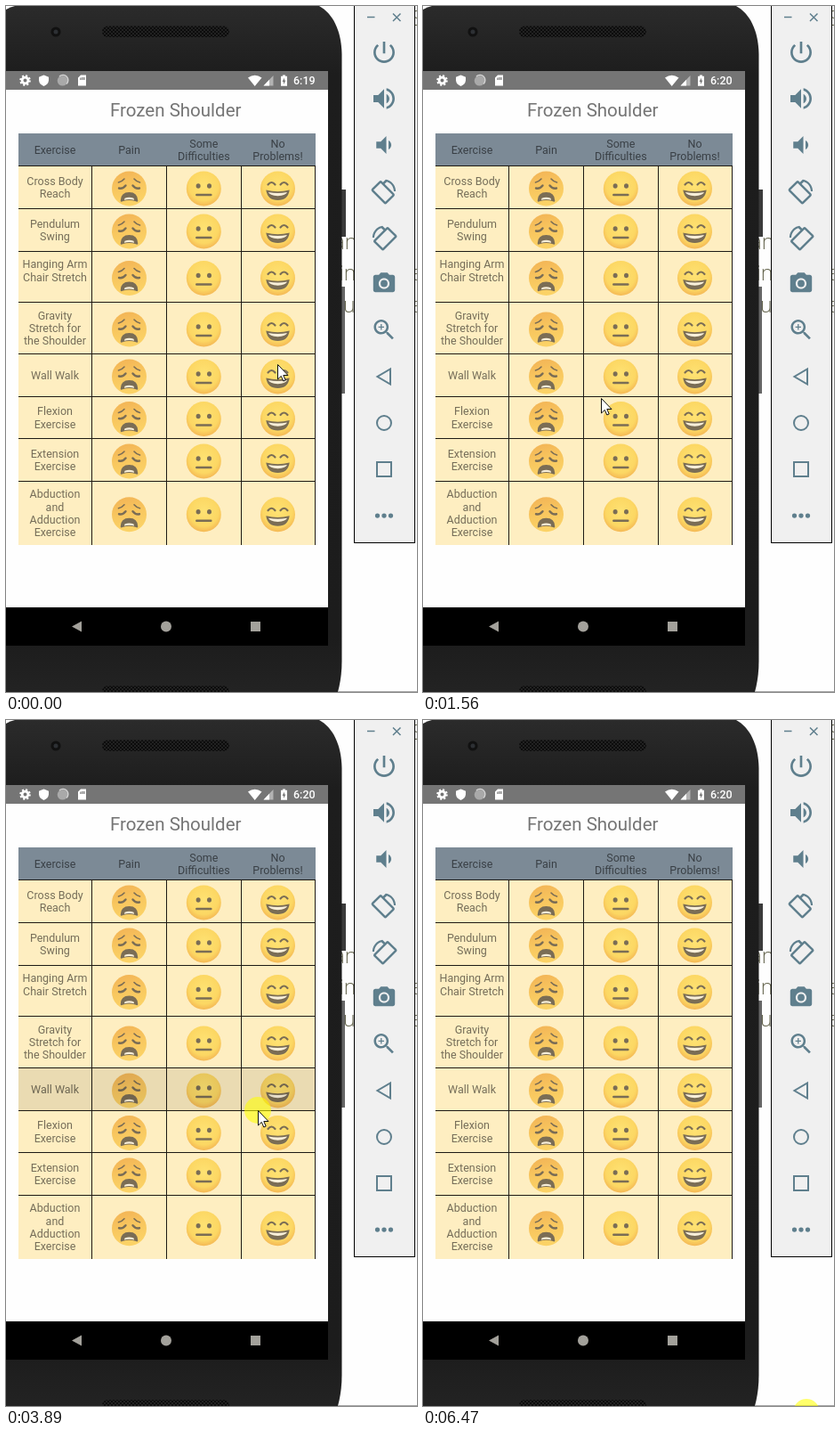
Animation of 462 by 770 pixels, one loop 6540 ms. Source, as an HTML page:

```html
<!DOCTYPE html>
<html lang="en">
<head>
<meta charset="utf-8">
<title>Exercise rating</title>
<style>
  html, body { margin: 0; width: 100%; height: 100%; overflow: hidden; background: #fefefe; }
  svg { display: block; width: 462px; height: 770px; }
  text { font-family: Roboto, sans-serif; }
  .cell { font-size: 12.5px; text-anchor: middle; fill: #000; fill-opacity: .54; }
  .page text { font: 300 23px "Open Sans", sans-serif; fill: #66664f; }
  .ink { fill: none; stroke: #7a6d55; stroke-linecap: round; stroke-linejoin: round; }
  .dark { fill: #7a6d55; }
  .teeth { fill: #f8efd9; }
  #dialog { transform-origin: 180px 384px; }
  #card { filter: drop-shadow(0 7px 7px rgba(0, 0, 0, .42)); }
  .line { fill: none; stroke: #5f7f8d; stroke-width: 2; }
</style>
</head>
<body>
<svg viewBox="0 0 462 770">
  <defs>
    <radialGradient id="skin" cx=".5" cy=".42" r=".6">
      <stop offset="0" stop-color="#fee273"/>
      <stop offset=".7" stop-color="#fcd763"/>
      <stop offset="1" stop-color="#f3b453"/>
    </radialGradient>
    <linearGradient id="sore" x2=".25" y2="1">
      <stop offset="0" stop-color="#f2b255"/>
      <stop offset=".55" stop-color="#f8c75f"/>
      <stop offset="1" stop-color="#fbd266"/>
    </linearGradient>
    <linearGradient id="shell" x2="0" y2="1">
      <stop offset="0" stop-color="#2b2b2b"/>
      <stop offset=".1" stop-color="#1d1d1d"/>
      <stop offset=".92" stop-color="#1c1c1c"/>
      <stop offset="1" stop-color="#232323"/>
    </linearGradient>
    <pattern id="mesh" width="4" height="4" patternUnits="userSpaceOnUse">
      <rect width="4" height="4" fill="#0c0c0c"/>
      <circle cx="1" cy="1" r=".9" fill="#2b2b2b"/>
      <circle cx="3" cy="3" r=".9" fill="#2b2b2b"/>
    </pattern>
    <g id="pain">
      <circle r="19.5" fill="url(#sore)"/>
      <path class="ink" stroke-width="1.6" d="M-12-7Q-8-8-5.5-11M12-7Q8-8 5.5-11"/>
      <path class="ink" stroke-width="2.4" d="M-11.5-.5Q-7 .5-4-3.5M11.5-.5Q7 .5 4-3.5"/>
      <path class="dark" d="M-9.8 13.5Q-9.5 4 0 4Q9.5 4 9.8 13.5Q9.5 15.5 7.5 14.3Q0 11.5-7.5 14.3Q-9.5 15.5-9.8 13.5Z"/>
      <path class="teeth" d="M-5 10.8Q0 8.8 5 10.8L5.6 12.8Q0 11-5.6 12.8Z"/>
    </g>
    <g id="some">
      <circle r="19.5" fill="url(#skin)"/>
      <ellipse class="dark" cx="-6.2" cy="-3" rx="2.5" ry="2.8"/>
      <ellipse class="dark" cx="6.2" cy="-3" rx="2.5" ry="2.8"/>
      <path class="ink" stroke-width="2.5" d="M-8 7H8"/>
    </g>
    <g id="fine">
      <circle r="19.5" fill="url(#skin)"/>
      <path class="ink" stroke-width="2.2" d="M-11-4.5Q-7-9.5-3-4.5M3-4.5Q7-9.5 11-4.5"/>
      <path class="dark" d="M-13.2 1.5Q0 5 13.2 1.5Q11.5 13 0 13Q-11.5 13-13.2 1.5Z"/>
      <path class="teeth" d="M-10.5 4Q0 6.2 10.5 4Q9.500 7.500 0 8.300Q-9.500 7.500-10.500 4Z"/>
    </g>
  </defs>

  <rect width="462" height="770" fill="#fefefe"/>
  <g class="page">
    <text x="368.5" y="273">an</text>
    <text x="374.5" y="308">in</text>
    <text x="379" y="344">u</text>
    <text x="455" y="308">e</text>
    <text x="455" y="344">e</text>
    <text x="455" y="22">S</text>
  </g>

  <!-- phone -->
  <path d="M377 206H382V259H377Z" fill="#3a3a3a"/>
  <path d="M377 315H381V435H377Z" fill="#666"/>
  <path d="M0 4Q5 1 10 0H352C367 8 377 27 377.500 54V735Q377.500 754 373 770H0Z" fill="url(#shell)"/>
  <rect x="108" y="22.5" width="143" height="12.5" rx="6" fill="url(#mesh)"/>
  <rect x="108" y="763" width="143" height="12.5" rx="6" fill="url(#mesh)"/>
  <circle cx="56" cy="29" r="5.5" fill="#111"/>
  <circle cx="56" cy="29" r="2.5" fill="#2d3034"/>
  <path d="M373 769.5H462" stroke="#a5a5a5"/>

  <!-- app -->
  <rect y="73" width="362" height="602" fill="#fefefe"/>
  <rect y="73" width="362" height="21" fill="#757575"/>
  <text x="117" y="124" font-size="20.5" fill="#757575">Frozen Shoulder</text>
  <g id="table"></g>
  <rect id="tint" x="14" width="334"/>
  <rect id="dim" y="73" width="362" height="602"/>

  <!-- status bar -->
  <g fill="#fff">
    <circle cx="21.5" cy="83.5" r="3.4" fill="none" stroke="#fff" stroke-width="2.8"/>
    <circle cx="21.5" cy="83.5" r="5.4" fill="none" stroke="#fff" stroke-width="1.8" stroke-dasharray="2.1 2.14"/>
    <path d="M42.5 77.5L48 79.7V83.5Q47.5 88 42.5 90Q37.5 88 37 83.5V79.7Z"/>
    <circle cx="63.5" cy="83.8" r="5.8" fill="#a9a9a9"/>
    <path d="M60 79A5.8 5.8 0 0 1 68 87.5" fill="none" stroke="#d5d5d5" stroke-width="1.4"/>
    <path fill-rule="evenodd" d="M84 77.5H90V89.5H81V80.5ZM83.3 80.5V83H84.5V80.5ZM85.3 80V83H86.5V80ZM87.3 80V83H88.5V80Z"/>
    <path d="M272 80.5Q279.7 75 287.5 80.5L279.7 90Z"/>
    <path d="M300.5 78V89.5H289.5Z" opacity=".45"/>
    <path d="M296 82.7V89.5H289.5Z"/>
    <path fill-rule="evenodd" d="M311 77.5H314V78.8H316V89.8H309V78.8H311ZM313 80.5L310.6 85H312V88L314.4 83.5H313Z"/>
    <text id="clock" x="323" y="88" font-size="12.5" font-weight="500"></text>
  </g>

  <g id="dialog">
    <rect id="card" x="22" y="307" width="316" height="154.5" rx="2" fill="#fefefe"/>
    <g font-weight="500">
      <g font-size="15.8" fill="#212121">
        <text x="43.5" y="340">You have successfully rated exercise</text>
        <text id="number" x="43.5" y="358.5"></text>
      </g>
      <text x="291" y="441.5" font-size="12.3" fill="#0c8f82">OK</text>
    </g>
  </g>

  <!-- navigation bar -->
  <rect y="675" width="362" height="43"/>
  <g fill="#a3a19b">
    <path d="M85 690.5V702.5L74 696.5Z"/>
    <circle cx="180" cy="696.5" r="6"/>
    <rect x="275" y="691" width="11" height="11"/>
  </g>

  <!-- tool panel -->
  <rect x="391.5" y="-2" width="68" height="604.5" fill="#f0f0f0" stroke="#000"/>
  <g id="tools" fill="#5f7f8d"></g>
  <path class="line" style="stroke-width: 1.5" d="M406 12.5H414.5M435 8.500L443.500 17M443.500 8.500L435 17"/>
  <g class="line">
    <path d="M432 407.5V424.5L417.5 416Z"/>
    <circle cx="425" cy="468" r="8"/>
    <rect x="417" y="512" width="16" height="16"/>
  </g>

  <circle id="click" r="15" fill="#ff0" fill-opacity=".58"/>
  <path id="cursor" d="M.5.5V17L4.3 13.4L6.8 19L9.2 18L6.8 12.5H12Z" fill="#fff" stroke="#111"/>
</svg>

<script>
const $ = id => document.getElementById(id);

// Table
const edges = [179.5, 227.5, 275.5, 332.5, 390.5, 438.5, 485.5, 533.5, 605];
const columns = [96.5, 180.5, 264.5, 347.5];
const centers = [55, 138.5, 222.3, 305.5];
const rows = ['Cross Body|Reach', 'Pendulum|Swing', 'Hanging Arm|Chair Stretch|', 'Gravity|Stretch for|the Shoulder',
  'Wall Walk', 'Flexion|Exercise', 'Extension|Exercise', 'Abduction|and|Adduction|Exercise'];
const heads = ['Exercise', 'Pain', 'Some|Difficulties', 'No|Problems!'];

function label(text, x, y) {
  const lines = text.split('|');
  return lines.map((s, i) =>
    `<text class="cell" x="${x}" y="${y + 4.5 + (i - (lines.length - 1) / 2) * 14.4}">${s}</text>`).join('');
}

function drawTable() {
  let out = '<rect x="14" y="143" width="334" height="37" fill="#7c8a96"/>' +
    '<rect x="14" y="180" width="334" height="425" fill="#feeec1"/>';
  heads.forEach((h, i) => out += label(h, centers[i], 161.7));
  rows.forEach((r, i) => {
    const mid = (edges[i] + edges[i + 1]) / 2;
    out += label(r, centers[0], mid);
    ['pain', 'some', 'fine'].forEach((f, j) =>
      out += `<use href="#${f}" x="${centers[j + 1]}" y="${mid + 1.5}"/>`);
  });
  const across = edges.slice(0, 8).map(y => `M14 ${y}H348`).join('');
  const down = columns.map(x => `M${x} 180V605`).join('');
  $('table').innerHTML = out + `<path d="${across}${down}" stroke="#1d1a14"/>`;
}

// Tool icons on a 24-unit grid
const rotate = '<rect x="-5.5" y="-8.5" width="11" height="17" rx="1" transform="translate(11 13) rotate(-45)" fill="none" stroke="#5f7f8d" stroke-width="2"/>' +
  '<path d="M22.5 12C22.5 6.500 18.500 2 13.500 1.300L10.500 4.300L12 5.800L14.500 3.400C18 4.500 20.500 7.500 20.800 12Z"/>';
const path = d => `<path d="${d}"/>`;
const icons = [
  [52, 1.33, path('M13 3h-2v10h2V3zm4.83 2.17l-1.42 1.42C17.99 7.86 19 9.81 19 12c0 3.87-3.13 7-7 7s-7-3.13-7-7c0-2.19 1.01-4.14 2.58-5.42L6.17 5.17C4.23 6.82 3 9.26 3 12c0 4.97 4.03 9 9 9s9-4.03 9-9c0-2.74-1.23-5.18-3.17-6.83z')],
  [104, 1.33, path('M3 9v6h4l5 5V4L7 9H3zm13.5 3c0-1.77-1.02-3.29-2.5-4.03v8.05c1.48-.73 2.5-2.25 2.5-4.02zM14 3.23v2.06c2.89.86 5 3.54 5 6.71s-2.11 5.85-5 6.71v2.06c4.01-.91 7-4.49 7-8.77s-2.99-7.86-7-8.77z')],
  [156, 1.25, path('M18.5 12c0-1.77-1.02-3.29-2.5-4.03v8.05c1.48-.73 2.5-2.25 2.5-4.02zM5 9v6h4l5 5V4L9 9H5z')],
  [208, 1.25, rotate],
  [260, 1.25, `<g transform="matrix(-1 0 0 1 24 0)">${rotate}</g>`],
  [311.5, 1.22, '<circle cx="12" cy="12" r="3.2"/>' + path('M9 2L7.17 4H4c-1.1 0-2 .9-2 2v12c0 1.1.9 2 2 2h16c1.1 0 2-.9 2-2V6c0-1.1-.9-2-2-2h-3.17L15 2H9zm3 15c-2.76 0-5-2.24-5-5s2.24-5 5-5 5 2.24 5 5-2.24 5-5 5z')],
  [363.5, 1.28, path('M15.5 14h-.79l-.28-.27C15.41 12.59 16 11.11 16 9.5 16 5.91 13.09 3 9.5 3S3 5.91 3 9.5 5.91 16 9.5 16c1.61 0 3.09-.59 4.23-1.57l.27.28v.79l5 4.99L20.49 19l-4.99-5zm-6 0C7.01 14 5 11.99 5 9.5S7.01 5 9.5 5 14 7.01 14 9.5 11.99 14 9.5 14zM12 10h-2v2H9v-2H7V9h2V7h1v2h2v1z')],
  [572, 1.25, [6, 12, 18].map(x => `<circle cx="${x}" cy="12" r="2.1"/>`).join('')]
];

function drawTools() {
  $('tools').innerHTML = icons.map(([y, s, body]) =>
    `<g transform="translate(425 ${y}) scale(${s}) translate(-12 -12)">${body}</g>`).join('');
}

const LOOP = 6540, TICKS = 84;
const route = [[0, 305, 402], [9, 305, 402], [12, 299, 442], [18, 299, 442], [20, 200, 440], [24, 197, 518],
  [34, 197, 518], [38, 258, 469], [39, 258, 469], [43, 313, 425], [46, 313, 425], [49, 283, 438], [65, 283, 438],
  [66, 283, 442], [71, 202, 728], [72, 202, 728], [74, 218, 758], [75, 224, 777], [83, 431, 777]];
const clicks = [1, 13, 26, 44, 50, 61, 83];
const presses = [{ from: 1, to: 2, row: 5 }, { from: 26, to: 30, row: 7 }, { from: 50, to: 51, row: 5 }];
const dialogs = [{ open: 5, close: 16, end: 19, row: 5 }, { open: 35, close: 47, end: 49, row: 7 },
  { open: 56, close: 64, end: 66, row: 5 }];
const enter = { dim: [.12, .3, .49, .6], alpha: [.4, .85, 1, 1], scale: [.95, .985, 1, 1] };
const leave = { dim: [.33, .08], alpha: [.45, 0], scale: [1, 1] };

function pointAt(k) {
  let i = 0;
  while (i < route.length - 2 && route[i + 1][0] <= k) i++;
  const [a, ax, ay] = route[i], [b, bx, by] = route[i + 1];
  const u = (k - a) / (b - a);
  return [ax + (bx - ax) * u, ay + (by - ay) * u];
}

function dialogAt(k) {
  const d = dialogs.find(d => k >= d.open && k < d.end);
  if (!d) return { dim: 0, alpha: 0, scale: 1, row: '' };
  const phase = k < d.close ? enter : leave;
  const i = Math.min(k - (k < d.close ? d.open : d.close), phase.dim.length - 1);
  return { dim: phase.dim[i], alpha: phase.alpha[i], scale: phase.scale[i], row: d.row };
}

function render(ms) {
  // The small lead keeps every tick at or before its rounded time.
  const k = Math.floor((ms % LOOP + 15) / (LOOP / TICKS)) % TICKS;
  const [x, y] = pointAt(k);
  $('cursor').setAttribute('transform', `translate(${Math.round(x)} ${Math.round(y)})`);
  $('click').setAttribute('transform', `translate(${x} ${y})`);
  $('click').style.opacity = clicks.includes(k) ? 1 : 0;
  $('clock').textContent = k < 12 ? '6:19' : '6:20';

  const press = presses.find(p => k >= p.from && k < p.to);
  $('tint').style.opacity = press ? .08 : 0;
  if (press) {
    $('tint').setAttribute('y', edges[press.row - 1]);
    $('tint').setAttribute('height', edges[press.row] - edges[press.row - 1]);
  }

  const d = dialogAt(k);
  $('dim').style.opacity = d.dim;
  $('dialog').style.opacity = d.alpha;
  $('dialog').style.transform = `scale(${d.scale})`;
  $('number').textContent = d.row;
}

drawTable();
drawTools();
const start = performance.now();
function loop() {
  render(performance.now() - start);
  requestAnimationFrame(loop);
}
loop();
</script>
</body>
</html>
```
